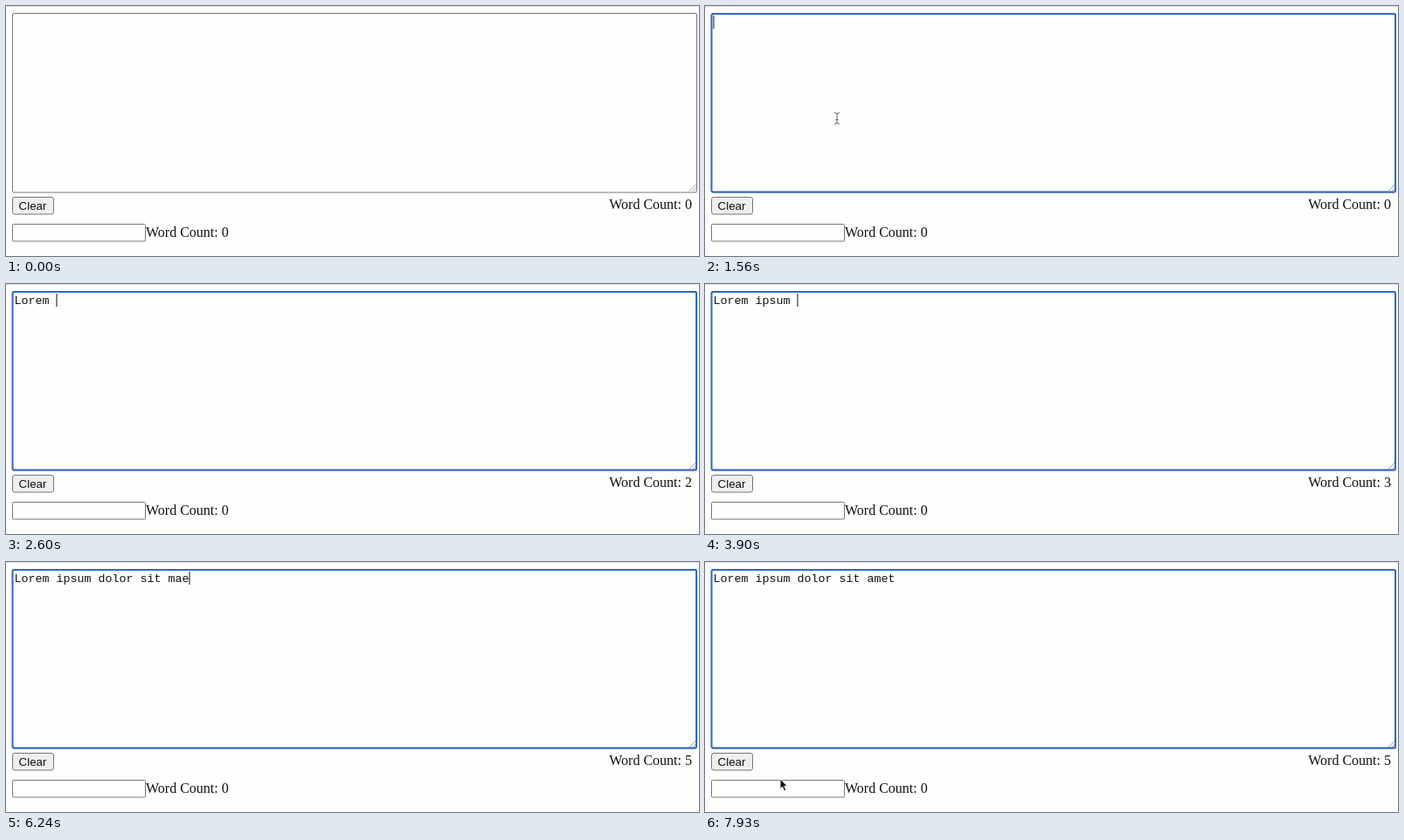
Animation of 793 by 287 pixels, one loop 8000 ms. Source, as an HTML page:

```html
<!DOCTYPE html>
<html lang="en">
<head>
<meta charset="utf-8">
<title>Word counter</title>
<style>
  html, body { margin: 0; width: 100%; height: 100%; overflow: hidden; background: #fefefe; }
  svg { display: block; width: 793px; height: 287px; }
  .serif { font: 16px "Liberation Serif", "Times New Roman", serif; }
  .mono { font: 13.333px "Liberation Mono", "Courier New", monospace; }
  .sans { font: 13.333px "Liberation Sans", Arial, sans-serif; }
  text { fill: #111; }
  .box { fill: #fff; stroke: #767676; }
  .grip { fill: none; stroke: #8a8a8a; stroke-width: .9; }
</style>
</head>
<body>
<svg viewBox="0 0 793 287">
  <rect id="page" width="793" height="287" fill="#fefefe"/>
  <rect width="793" height="1" fill="#e2e2e2"/>

  <rect id="halo" x="6.5" y="7.5" width="785" height="207" rx="3" fill="none" stroke="#b9cdf0" stroke-width="4"/>
  <rect id="area" class="box" x="7.5" y="8.5" width="783" height="205.5" rx="1.5"/>
  <path class="grip" d="M782 212.5 789.5 205M786 212.5 789.5 209"/>
  <rect id="ring" x="7.5" y="9" width="782.5" height="204.5" rx="2" fill="none" stroke-width="2"/>
  <text id="typed" class="mono" x="9.5" y="23"></text>
  <rect id="caret" x="9.5" y="11" width="1" height="15" fill="#111"/>

  <rect class="box" style="fill:#efefef" x="7.5" y="219.5" width="47" height="19.5" rx="2.5"/>
  <text class="sans" x="14.6" y="233.6">Clear</text>
  <text id="count" class="serif" x="690.3" y="232.5"></text>

  <rect class="box" x="7.5" y="250.5" width="152" height="19.5" rx="1"/>
  <text class="serif" x="160" y="264.5">Word Count: 0</text>

  <path id="beam" fill="none" stroke="#666" d="M-3-6.5Q0-6.5 0-4.5Q0-6.5 3-6.5M0-4.5V4.5M-3 6.5Q0 6.5 0 4.5Q0 6.5 3 6.5M-1.5 1.5H1.5"/>
  <path id="arrow" fill="#111" stroke="#fff" stroke-width=".9" d="M0 0V11.5L2.6 9.1 4.7 13.8 6.8 12.9 4.8 8.3H8.2Z"/>
</svg>
<script>
  const LOOP = 8000, TICK = 130, BLINK = 520;
  const CLICK = 520, FOCUS = 390, LEAVE = 7410, END = 7930;
  const el = id => document.getElementById(id);
  const show = (id, on) => el(id).setAttribute("visibility", on ? "visible" : "hidden");
  const mix = (a, b, k) => a + (b - a) * k;

  // "<" is a backspace; each key has its press time in ticks.
  const keys = "Lorem ipsum dolor sit mae<<<amet";
  const ticks = [13, 14, 16, 17, 18, 19, 21, 22, 24, 25, 27, 30, 32, 33, 34, 35, 37, 38,
                 39, 40, 42, 43, 44, 45, 48, 49, 50, 51, 52, 53, 55, 56];

  function typedAt(t) {
    let text = "", last = CLICK;
    ticks.forEach((tick, i) => {
      if (tick * TICK > t) return;
      text = keys[i] === "<" ? text.slice(0, -1) : text + keys[i];
      last = tick * TICK;
    });
    return { text, last };
  }

  function pointerAt(t) {
    if (t < TICK) return null;
    if (t < ticks[0] * TICK) {
      const k = Math.min(1, (t - TICK) / (FOCUS - TICK)), e = 1 - (1 - k) ** 2;
      return [mix(185, 151, e), mix(20, 129, e)];
    }
    if (t < LEAVE) return null;
    const k = (t - LEAVE) / (END - LEAVE), e = k * k * (3 - 2 * k);
    return [mix(151, 86, e), mix(129, 249, e)];
  }

  function draw(t) {
    const { text, last } = typedAt(t);
    const focused = t >= FOCUS, settled = t > CLICK;
    el("typed").textContent = text;
    el("count").textContent = "Word Count: " + (text ? text.split(" ").length : 0);
    el("caret").setAttribute("x", 9.5 + 8 * text.length);
    show("caret", t >= CLICK && Math.floor((t - last) / BLINK) % 2 === 0);

    show("ring", focused);
    el("ring").setAttribute("stroke", settled ? "#2f67c4" : "#4469b8");
    el("halo").setAttribute("opacity", focused && !settled ? .45 : 0);
    const paper = focused && t < END ? "#fefefc" : "#fefefe";
    el("page").setAttribute("fill", paper);
    el("area").style.fill = paper;

    const p = pointerAt(t), inside = p && p[1] < 214;
    show("beam", p && inside);
    show("arrow", p && !inside);
    if (p) el(inside ? "beam" : "arrow").setAttribute("transform", `translate(${p})`);
  }

  const start = performance.now();
  (function frame() {
    const t = (performance.now() - start) % LOOP;
    draw(Math.floor(t / TICK) * TICK);
    requestAnimationFrame(frame);
  })();
</script>
</body>
</html>
```
